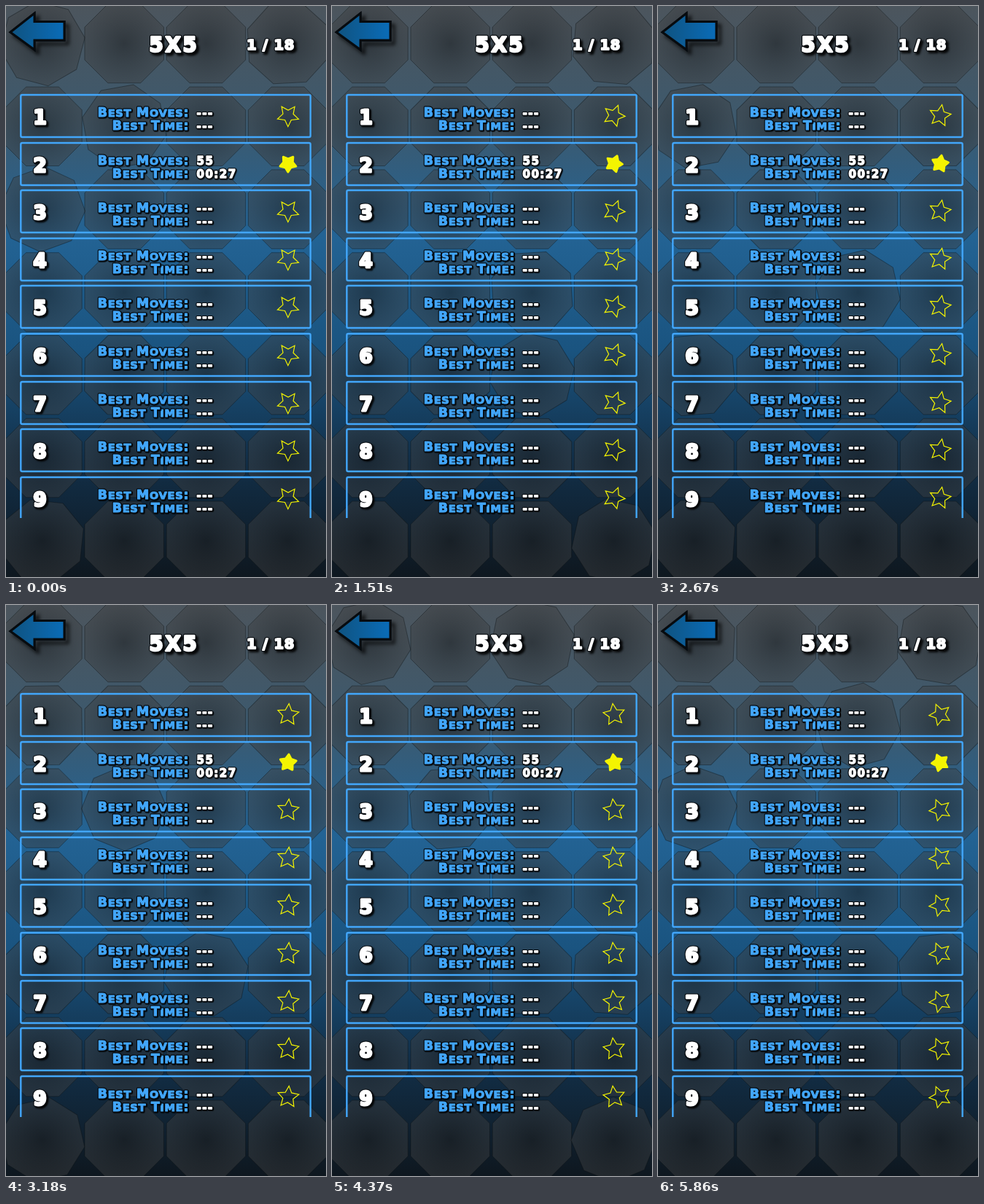
An HTML page with a canvas for the animation above (5950 ms loop, 439 by 784 pixels).

```html
<!DOCTYPE html>
<html lang="en">
<head>
<meta charset="utf-8">
<title>Level list</title>
<style>
html, body { margin: 0; width: 100%; height: 100%; overflow: hidden; background: #17222c; }
canvas { display: block; width: 100vw; height: 100vh; }
</style>
</head>
<body>
<canvas id="stage" width="439" height="784"></canvas>
<script>
const W = 439, H = 784, LOOP = 5950;
const COLS = 4, ROWS = 7;
const TURN_MS = 1100, TURN_GAP = 170;
const STAR_SPEED = -10, STAR_UPRIGHT = 3650; // degrees per second, ms
const FONT = '"DejaVu Sans", sans-serif';
const BLUE = '#42a6fa', YELLOW = '#f4f400', DARK = '#070b0f';
const ctx = document.getElementById('stage').getContext('2d');

const smooth = u => u * u * (3 - 2 * u);
const clamp = u => Math.max(0, Math.min(1, u));
const radians = deg => deg * Math.PI / 180;

function seeded(seed) {
  return () => (seed = seed * 16807 % 2147483647) / 2147483647;
}

function path(points) {
  ctx.beginPath();
  points.forEach(([x, y]) => ctx.lineTo(x, y));
  ctx.closePath();
}

const ring = (n, start, radius) => Array.from({ length: n }, (_, i) => {
  const a = radians(start + i * 360 / n), r = radius(i);
  return [r * Math.cos(a), r * Math.sin(a)];
});

const octagon = ring(8, 22.5, () => 58.7);
const star = ring(10, -90, i => i % 2 ? 7.4 : 15.2);
const solidStar = ring(10, -90, i => i % 2 ? 6.6 : 11.5);

function gradient(shape, colors) {
  colors.forEach((color, i) => shape.addColorStop(i / (colors.length - 1), color));
  return shape;
}

const backdrop = gradient(ctx.createLinearGradient(0, 0, 0, H),
  ['#4c555d', '#3d596d', '#236394', '#1a5480', '#122f48', '#0e171f']);
const tileFill = gradient(ctx.createRadialGradient(0, 0, 0, 0, 0, 58),
  ['rgba(30,32,34,.57)', 'rgba(46,48,50,.51)', 'rgba(62,64,66,.46)']);
const arrowFill = gradient(ctx.createLinearGradient(5, 0, 80, 0), ['#0f527f', '#0a6cb8']);

// now and then a random tile turns by one eighth
const random = seeded(77);
const turns = [];
for (let start = -TURN_MS; start < LOOP; start += TURN_GAP) {
  turns.push({ start, tile: Math.floor(random() * COLS * ROWS) });
}

function tileAngle(tile, t) {
  return turns.filter(turn => turn.tile === tile)
    .reduce((sum, turn) => sum + radians(45) * smooth(clamp((t - turn.start) / TURN_MS)), 0);
}

function drawTiles(t) {
  ctx.lineWidth = 1;
  ctx.strokeStyle = 'rgba(10,14,18,.38)';
  ctx.fillStyle = tileFill;
  for (let tile = 0; tile < COLS * ROWS; tile++) {
    ctx.save();
    ctx.translate(50 + tile % COLS * 112.2, 51.5 + Math.floor(tile / COLS) * 113.8);
    ctx.rotate(tileAngle(tile, t));
    path(octagon);
    ctx.fill();
    ctx.stroke();
    ctx.restore();
  }
}

function shadow(size) {
  ctx.shadowColor = 'rgba(0,0,0,.9)';
  ctx.shadowBlur = ctx.shadowOffsetX = ctx.shadowOffsetY = size;
}

function setFont(size, spacing) {
  ctx.font = `bold ${size}px ${FONT}`;
  ctx.letterSpacing = spacing + 'px';
}

// thick lettering with a dark rim and a shadow
function heavy(text, x, y, color, weight, drop) {
  ctx.lineJoin = 'round';
  ctx.save();
  shadow(drop);
  ctx.strokeStyle = DARK;
  ctx.lineWidth = weight + 2.2;
  ctx.strokeText(text, x, y);
  ctx.restore();
  ctx.strokeStyle = ctx.fillStyle = color;
  ctx.lineWidth = weight;
  ctx.strokeText(text, x, y);
  ctx.fillText(text, x, y);
}

// small capitals, set flush right
function label(text, right, y) {
  const runs = text.match(/[a-z]+|[^a-z]+/g).reverse();
  let x = right;
  for (const run of runs) {
    const word = run.toUpperCase();
    setFont(word === run ? 17.3 : 14.6, 0.7);
    x -= ctx.measureText(word).width;
    heavy(word, x, y, BLUE, 1.1, 1);
  }
}

function drawStar(y, angle, solid) {
  ctx.save();
  ctx.translate(387, y);
  ctx.rotate(angle);
  ctx.strokeStyle = ctx.fillStyle = YELLOW;
  ctx.lineJoin = solid ? 'round' : 'miter';
  ctx.lineWidth = solid ? 3 : 1.2;
  path(solid ? solidStar : star);
  if (solid) ctx.fill();
  ctx.stroke();
  ctx.restore();
}

function drawRow(i, starAngle) {
  const y = Math.round(122 + i * 65.6), done = i === 1;
  ctx.beginPath();
  ctx.roundRect(20.3, y, 397.4, 58, 2);
  ctx.strokeStyle = BLUE;
  ctx.lineWidth = 2.4;
  ctx.stroke();

  setFont(26, 0);
  ctx.textAlign = 'center';
  heavy(i + 1, 46.5, y + 40, '#fff', 3, 2);
  ctx.textAlign = 'left';
  label('Best Moves:', 251, y + 30);
  label('Best Time:', 251, y + 48.2);
  setFont(15, 1.5);
  heavy(done ? '55' : '---', 261.5, y + 29.5, '#fff', 1.4, 1);
  heavy(done ? '00:27' : '---', 261.5, y + 47.7, '#fff', 1.4, 1);
  drawStar(y + 28.5, starAngle, done);
}

function drawHeader() {
  path([[6, 36], [39, 10], [39, 21.5], [80, 21.5], [80, 47], [39, 47], [39, 60]]);
  ctx.lineJoin = 'miter';
  ctx.lineWidth = 3;
  ctx.strokeStyle = DARK;
  ctx.fillStyle = arrowFill;
  ctx.save();
  shadow(5);
  ctx.stroke();
  ctx.restore();
  ctx.fill();
  ctx.stroke();

  setFont(27.5, 2.8);
  heavy('5X5', 196.5, 62.5, '#fff', 2.6, 3);
  setFont(19.5, 0.8);
  heavy('1 / 18', 330, 60, '#fff', 2, 3);
}

function draw(t) {
  ctx.fillStyle = backdrop;
  ctx.fillRect(0, 0, W, H);
  drawTiles(t);
  drawHeader();
  ctx.save();
  ctx.beginPath();
  ctx.rect(0, 110, W, 593);
  ctx.clip();
  const starAngle = radians(STAR_SPEED * (t - STAR_UPRIGHT) / 1000);
  for (let i = 0; i < 9; i++) drawRow(i, starAngle);
  ctx.restore();
}

// the picture rests briefly at two moments
function held(t) {
  if (t < 250) return 0;
  if (t >= 850 && t < 1010) return 850;
  return t;
}

const began = performance.now();
function tick() {
  draw(held((performance.now() - began) % LOOP));
  requestAnimationFrame(tick);
}
tick();
</script>
</body>
</html>
```
